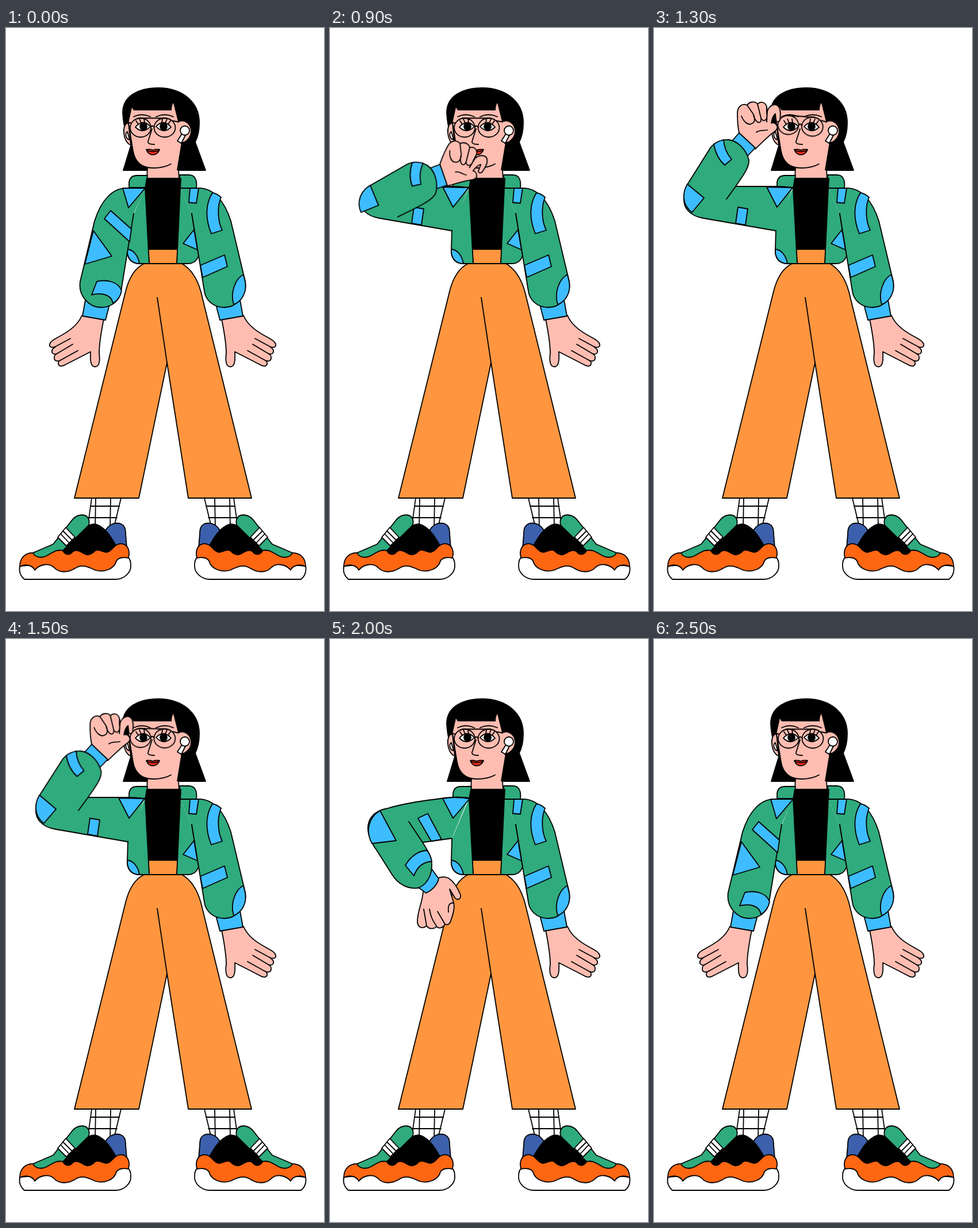
Write an HTML page that moves like this. It is 553 px wide and 1012 px high and loops after 3.3 s.

```html
<!DOCTYPE html>
<html lang="en">
<head>
<meta charset="utf-8">
<title>Adjusting glasses</title>
<style>
  html, body { margin: 0; width: 100%; height: 100%; overflow: hidden; background: #fff; }
  svg { display: block; width: 100vw; height: 100vh; }
  path, circle, ellipse { stroke: #000; stroke-width: 1.8; stroke-linejoin: round; stroke-linecap: round; }
  .green { fill: #2fab7d; }
  .blue { fill: #3dbdff; }
  .skin { fill: #ffbdb1; }
  .pants { fill: #ff963f; }
  .rubber { fill: #ff6612; }
  .navy { fill: #3c60ab; }
  .white { fill: #fff; }
  .red { fill: #f5301a; }
  .black { fill: #000; }
  .line { fill: none; }
  .bare { stroke: none; }

  /* every pose is held, then swapped */
  .pose, .part { animation: 3.3s step-end infinite; }
  .pose { opacity: 0; }
  #rest { animation-name: rest; }
  #bent { animation-name: bent; }
  #fist { animation-name: fist; }
  #lift { animation-name: lift; }
  #hip { animation-name: hip; }
  #fore { animation-name: sway; transform-origin: 60px 296px; }
  #pinch { animation-name: pinch; }
  #point { animation-name: point; }
  #glasses { animation-name: tilt; transform-origin: 300px 163px; }
  #open { animation-name: open; }
  #shut { animation-name: shut; }

  @keyframes rest { 0%, 66.66% { opacity: 1 } 24.24% { opacity: 0 } }
  @keyframes bent { 0%, 27.27%, 66.66% { opacity: 0 } 24.24%, 63.63% { opacity: 1 } }
  @keyframes fist { 0%, 33.33% { opacity: 0 } 30.3% { opacity: 1 } }
  @keyframes lift { 0%, 30.3%, 60.6% { opacity: 0 } 27.27%, 33.33% { opacity: 1 } }
  @keyframes hip { 0%, 63.63% { opacity: 0 } 60.6% { opacity: 1 } }
  @keyframes pinch { 0% { opacity: 1 } 54.54% { opacity: 0 } }
  @keyframes point { 0% { opacity: 0 } 54.54% { opacity: 1 } }
  @keyframes open { 0%, 75.75% { opacity: 1 } 69.69% { opacity: 0 } }
  @keyframes shut { 0%, 75.75% { opacity: 0 } 69.69% { opacity: 1 } }
  @keyframes sway {
    0%, 39.39%, 48.48% { transform: rotate(0deg) }
    27.27% { transform: rotate(28deg) }
    33.33% { transform: rotate(1.5deg) }
    36.36% { transform: rotate(.7deg) }
    42.42% { transform: rotate(1deg) }
    45.45% { transform: rotate(.5deg) }
  }
  @keyframes tilt {
    0%, 48.48% { transform: rotate(0deg) }
    36.36% { transform: rotate(2deg) }
    39.39% { transform: rotate(4deg) }
    42.42% { transform: rotate(2.4deg) }
    45.45% { transform: rotate(1deg) }
  }
</style>
</head>
<body>
<svg viewBox="0 0 553 1012" preserveAspectRatio="none">
  <defs>
    <g id="foot">
      <path class="white" d="M149 816 L142 866 L186 874 L200 816Z"/>
      <path class="line" d="M156 816 L155 868 M182 816 L181 870 M147 830 H197 M144 850 H193"/>
      <path class="navy" d="M172 874 C178 862 188 858 198 860 C207 863 208 870 208 878 L210 902 L188 900Z"/>
      <path class="black" d="M94 908 L143 864 C150 860 158 861 164 865 C176 872 184 886 191 898 L176 916 H110Z"/>
      <path class="white" d="M24 934 C22 945 26 952 32 957 H190 C206 957 218 945 217 932 C217 925 215 921 212 918Z"/>
      <path class="rubber" d="M24 935 C24 918 35 911 47 911 L98 906 C102 915 111 916 116 909 C122 904 130 909 135 912 C142 917 150 913 154 908 C161 903 168 910 175 910 C183 909 186 901 191 898 C200 892 210 896 213 905 C215 912 214 917 212 920 C205 918 196 919 192 925 C189 938 172 946 155 941 C142 935 132 930 120 938 C107 946 92 946 83 936 C74 928 58 931 50 941 C46 932 33 930 24 935Z"/>
      <path class="green" d="M47 911 L82 896 L115 854 C124 843 140 842 144 853 C145 857 145 861 143 864 L99 907 C89 904 80 911 71 916 C62 921 50 919 47 911Z"/>
      <path class="white" d="M104 867 L120 884 L105 899 L90 884Z M99 873 L115 889 M95 878 L110 894"/>
    </g>
    <g id="sleeve">
      <path class="skin" d="M375 505 C380 530 383 548 383 565 C381 578 383 588 390 588 C397 588 399 580 398 562 L441 584 C447 588 453 588 454 583 C455 580 452 577 449 576 C455 580 461 578 461 573 C462 569 458 566 456 565 C462 568 466 564 465 560 C465 557 461 555 459 553 C465 556 470 554 469 549 C468 544 462 541 455 537 C440 529 421 518 413 499Z"/>
      <path class="line" d="M433 539 L459 553 M429 549 L456 565 M420 560 L449 576"/>
      <path class="blue" d="M365 480 L372 507 L412 500 L407 472Z"/>
      <path class="green" d="M303 278 H334 C360 277 380 300 391 335 L416 440 C420 465 400 485 380 485 C360 485 347 472 345 457 L323 322"/>
    </g>
  </defs>

  <use href="#foot"/>
  <use href="#foot" transform="matrix(-1 0 0 1 545 0)"/>

  <g id="legs">
    <path class="pants" d="M240 409 H306 C325 420 334 440 339 458 L427 816 H317 L280 581 L231 816 H119 L208 457 C213 437 222 418 240 409Z"/>
    <path class="line" d="M263 468 L280 581"/>
  </g>

  <g id="head">
    <path class="black" d="M203 147 C203 117 232 104 264 104 C308 104 337 130 336 166 C336 180 333 190 329 198 L347 247 H204 L218 201 C207 185 204 165 203 147Z"/>
    <path class="skin" d="M213 165 C201 164 202 198 217 203Z"/>
    <path class="white" d="M211 180 C207 182 207 192 215 194Z"/>
    <path class="skin bare" d="M219 138 L222 143 H288 C288 137 289 133 291 130 L299 162 L305 199 L297 247 H301 V264 H245 V242 C231 238 224 226 221 214 L213 165Z"/>
    <path class="skin" d="M299 163 C311 157 322 167 322 179 C322 190 314 198 304 200"/>
    <path class="line" d="M213 165 L221 214 C225 237 240 243 256 243 C269 243 280 240 287 236 M246 242 L245 262 M300 247 L301 262"/>
    <path class="white" d="M307 182 L298 196 L305 200 L312 186Z"/>
    <circle class="white" cx="311" cy="178" r="8"/>
    <path class="line" d="M222 154 Q236 147 251 154 M261 154 Q276 147 291 154"/>
    <path class="line" d="M254 175 L247 197 Q246 202 258 202"/>
    <path class="red" d="M244 211 Q250 210 255 212 Q261 210 267 211 Q264 220 255 220 Q247 220 244 211Z"/>
    <path class="line" d="M246 213 Q256 216 265 213"/>
    <g id="open" class="part">
      <path class="white" d="M225 172 Q238 157 251 171 Q238 185 225 172Z M261 171 Q274 157 287 172 Q274 185 261 171Z"/>
      <circle class="black" cx="239" cy="171" r="6"/>
      <circle class="black" cx="274" cy="171" r="6"/>
      <path class="line" d="M230 167 L226 161 M235 165 L232 158 M241 164 L240 158 M271 164 L272 158 M277 165 L280 158 M282 167 L286 161"/>
    </g>
    <g id="shut" class="part">
      <path class="line" d="M225 171 Q238 181 251 171 M261 171 Q274 181 287 171 M230 175 L227 180 M236 176 L235 181 M276 176 L277 181 M282 175 L285 180"/>
    </g>
    <g id="glasses" class="part">
      <ellipse class="line" cx="234" cy="173" rx="18" ry="16.5"/>
      <ellipse class="line" cx="276" cy="173" rx="18.5" ry="16.5"/>
      <path class="line" d="M212 164 L218 165 M230 156.500 H279 M252 172 Q254 168 258 172 M289 161 L300 163"/>
    </g>
  </g>

  <g id="jacket">
    <path class="green" d="M244 277 H214 V268 C215 260 220 256 228 256 H246Z M302 278 H331 C333 263 328 255 318 255 H302Z"/>
    <path class="pants" d="M247 380 H299 L297 409 H249Z"/>
    <path class="black" d="M245 261 H304 L298 384 H248 L242 278Z"/>
    <path class="green" d="M212 347 L211 385 C210 400 218 409 232 409 H249 L242 277"/>
    <path class="blue" d="M211 384 C222 385 230 396 232 409 C218 409 210 399 211 384Z"/>
    <path class="green" d="M323 322 L335 395 C332 404 326 409 316 409 H297 L303 278"/>
    <path class="blue" d="M327 350 L308 374 L333 385Z"/>
  </g>

  <g id="far">
    <use href="#sleeve"/>
    <path class="blue" d="M320 278 H335 L331 304 L318 303Z"/>
    <path class="blue" d="M359 286 C347 305 346 330 357 357 L376 351 C368 335 367 310 374 294 C369 289 364 287 359 286Z"/>
    <path class="blue" d="M338 412 L380 394 L385 414 L342 433Z"/>
    <path class="blue" d="M413 428 C400 434 389 458 396 480 C411 474 419 458 416 441Z"/>
  </g>

  <g id="rest" class="pose">
    <use href="#sleeve" transform="matrix(-1 0 0 1 545 0)"/>
    <path class="blue" d="M203 278 H242 L213 312Z"/>
    <path class="blue" d="M182 317 L218 349 L215 371 L171 331Z"/>
    <path class="blue" d="M152 352 L184 396 L137 410Z"/>
    <path class="blue" d="M149 463 L158 440 C175 436 195 440 201 456 C199 466 193 474 186 478 C184 466 172 458 149 463Z"/>
  </g>

  <g id="bent" class="pose">
    <path class="skin" d="M123 488 C120 510 105 525 82 543 C77 547 76 553 80 556 C83 558 86 555 88 553 C80 560 79 566 85 568 C88 569 91 567 93 565 C86 571 87 576 92 576 C94 577 97 575 99 573 C95 578 100 583 106 580 L147 547 C152 558 157 563 162 563 C167 563 168 556 166 549 C158 530 157 510 156 486Z"/>
    <path class="line" d="M111 531 L88 553 M118 542 L93 565 M119 554 L99 573"/>
    <path class="blue" d="M118 458 L121 490 L161 487 L158 456Z"/>
    <path class="green" d="M243 276 C225 273 210 275 190 285 L118 321 C98 331 93 350 94 372 L100 430 C102 450 115 464 138 464 C158 464 168 452 169 436 L167 376 L212 346"/>
    <path class="blue" d="M204 279 C218 274 230 274 243 276 L214 311Z"/>
    <path class="blue" d="M158 328 L175 317 L200 351 L183 364Z"/>
    <path class="blue" d="M109 326 L135 371 L94 375 C93 356 97 336 109 326Z"/>
    <path class="blue" d="M121 423 C137 414 155 413 168 424 C170 434 169 442 165 448 C152 439 137 440 123 445Z"/>
  </g>

  <g id="fist" class="pose">
    <path class="skin" d="M156 168 C150 155 146 145 146 130 C146 118 155 112 163 117 C165 109 178 107 182 113 C186 106 197 107 199 116 C203 108 213 106 218 112 C221 118 221 130 220 142 C221 150 215 158 208 159 C200 168 192 176 184 189Z"/>
    <path class="line" d="M169 126 L173 145 C175 152 186 151 186 144 L182 113 M186 144 C190 149 201 146 201 138 L199 116 M173 146 C170 153 160 157 156 149"/>
    <path class="black" d="M208 137 L204 153 L213 147Z"/>
    <path class="line" d="M201 118 C202 126 206 131 208 137 M204 153 C209 148 214 145 220 144"/>
    <path class="blue" d="M156 166 L186 187 L173 205 L143 183Z"/>
    <path class="green" d="M241 277 L154 264 L141 286 L154 264 C165 246 178 226 177 207 C172 192 152 182 141 179 C125 178 112 186 105 200 L78 262 C70 280 74 305 97 313 L212 351"/>
    <path class="blue" d="M197 270 L241 277 L213 312Z"/>
    <path class="blue" d="M142 298 L160 304 L154 333 L136 326Z"/>
    <path class="blue" d="M76 265 L111 286 L94 312 C76 306 70 284 76 265Z"/>
    <path class="blue" d="M115 190 C120 208 127 218 136 224 L148 212 C139 205 132 195 131 180 C125 182 119 185 115 190Z"/>
  </g>

  <g id="lift" class="pose">
    <path class="green" d="M241 277 Q226 275 210 275 H138 L52 296 C51 312 62 326 85 330 L212 352"/>
    <path class="blue" d="M196 276 L241 277 L214 311Z"/>
    <path class="blue" d="M146 311 L163 314 L159 342 L142 339Z"/>
    <g id="fore" class="part">
      <g id="pinch" class="part">
        <path class="skin" d="M149 186 C145 172 145 160 145 148 C145 136 154 130 162 134 C166 127 176 127 180 132 C186 126 194 129 196 137 L197 145 C200 134 212 129 217 137 C221 143 220 152 219 160 C216 165 212 163 212 158 L211 149 C206 152 205 160 204 165 C208 164 212 166 214 170 C216 174 212 178 208 181 C198 188 188 199 176 210Z"/>
        <path class="line" d="M152 153 C157 165 165 169 170 166 C176 164 176 157 173 150 L162 134 M173 152 C179 169 188 166 186 156 L180 132 M186 157 C192 165 198 159 196 148 L196 137 M178 181 C184 176 190 179 197 177 M197 145 L196 163"/>
      </g>
      <g id="point" class="part">
        <path class="skin" d="M149 186 C145 172 146 160 147 150 C147 135 149 126 156 124 C163 122 168 125 169 128 C172 121 182 121 184 127 C190 124 197 127 197 136 L197 145 C200 134 212 129 217 134 C222 140 221 150 220 158 C217 164 212 162 211 157 L210 149 C206 152 205 160 204 167 C208 164 212 166 214 170 C216 174 212 178 208 181 C198 188 188 199 176 210Z"/>
        <path class="line" d="M157 132 C155 142 154 150 156 157 C160 163 167 162 168 156 L169 128 M168 156 C170 163 180 163 182 157 L184 127 M182 157 C184 167 192 166 193 159 L197 140 M178 181 C184 176 190 179 197 177"/>
      </g>
      <path class="blue" d="M148 182 L176 208 L160 225 L134 198Z"/>
      <path class="green" d="M126 297 L142 275 C152 260 166 243 165 229 C160 210 145 196 130 194 C117 193 105 199 98 208 L59 270 C54 278 52 288 52 296"/>
      <path class="blue" d="M58 271 L87 295 L66 320 C50 308 48 288 58 271Z"/>
      <path class="blue" d="M104 202 C107 219 114 230 123 238 L135 228 C127 219 122 208 121 194 C114 196 108 198 104 202Z"/>
    </g>
  </g>

  <g id="hip" class="pose">
    <path class="skin" d="M162 438 C161 456 153 470 152 488 C151 501 161 504 168 498 C172 504 181 504 185 499 C190 504 197 501 200 495 C206 498 210 492 211 486 C215 476 217 464 215 458 C213 450 210 442 208 434 L217 449 C222 455 228 451 227 444 C222 432 214 420 206 415 C199 412 191 413 186 416Z"/>
    <path class="line" d="M206 474 C205 464 206 458 215 458 M163 469 L168 498 M173 469 C175 480 177 487 185 498 M187 473 L200 495"/>
    <path class="blue" d="M152 430 L167 441 C178 436 187 426 189 416 L176 398Z"/>
    <path class="green" d="M241 276 C225 273 200 275 185 278 C150 282 120 288 100 294 C75 298 62 315 67 338 C70 350 76 360 82 368 L108 409 C118 425 135 435 154 432 C171 425 180 405 176 382 C174 374 168 364 161 353 L137 317 L161 353 L212 346"/>
    <path class="blue" d="M196 277 C212 274 228 275 243 277 L214 311Z"/>
    <path class="blue" d="M153 311 L170 303 L194 348 L176 351Z"/>
    <path class="blue" d="M87 298 L115 350 L73 355 C62 335 66 310 87 298Z"/>
    <path class="blue" d="M131 393 C140 377 155 367 169 367 C173 373 176 380 177 386 C161 387 151 397 146 411Z"/>
  </g>
</svg>
</body>
</html>
```
